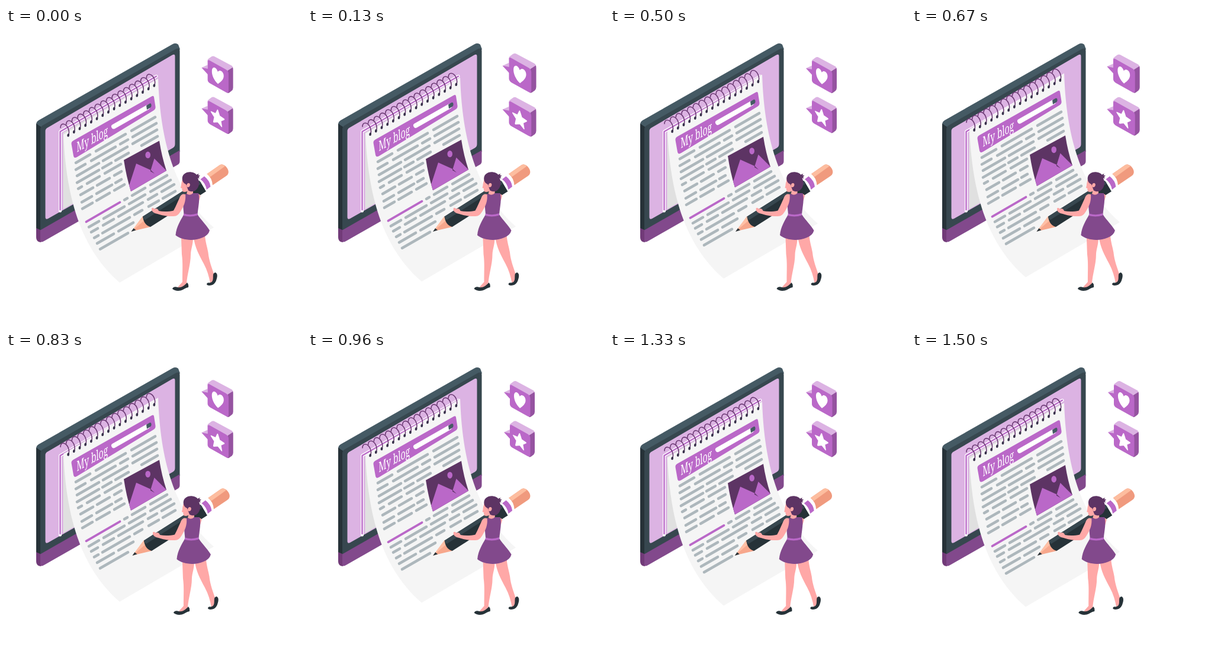
Write an HTML page that moves like this. It is 500 by 500 pixels and loops after 1540 ms.

```html
<!DOCTYPE html>
<html lang="en">
<head>
<meta charset="utf-8">
<title>My blog</title>
<style>
html, body { margin: 0; width: 100%; height: 100%; overflow: hidden; background: #fff; }
svg { display: block; width: 100vw; height: 100vh; }
.main { fill: #ba68c8; }
.deep { fill: #82498c; }
.dark { fill: #5d3464; }
.pale { fill: #dcb3e3; }
.ink { fill: #263238; }
.slate { fill: #37474f; }
.skin { fill: #ffa8a7; }
.white { fill: #fff; }
.line { fill: none; stroke-linecap: round; stroke-linejoin: round; }
text { font: 500 23.5px "Noto Serif", serif; fill: #fff; }
</style>
</head>
<body>
<svg viewBox="0 0 500 500">
  <g id="monitor">
    <path fill="#455a64" d="M51 163Q51 158.500 55 156L281 27.500Q287 24.500 291 28L294 36 60 170Z"/>
    <path class="ink" d="M51 161.500L59 167V343L51 339Z"/>
    <path fill="#713a78" d="M51 338L59 341.500V362Q51 361 51 354Z"/>
    <path class="slate" d="M58 171Q58 167 62 164.500L286 36Q293.500 32 293.500 39V209L58 343Z"/>
    <path class="deep" d="M58 341.500L293.500 206.500V225Q293.500 229 290 231L65 359.500Q58 363.500 58 359Z"/>
    <path class="pale" d="M66.500 174Q66.500 170.500 70 168.500L281 45.500Q285.500 43 285.500 48V196Q285.500 200.500 282 202.500L71 322Q66.500 324.500 66.500 319Z"/>
    <path fill="#e0e0e0" d="M96.500 177L254 87V216L96.500 306Z"/>
    <path class="line" stroke="#fff" stroke-width="5" stroke-linecap="butt" d="M91.500 309V175L254 81.500"/>
    <path class="line" stroke="#ba68c8" stroke-width="2.400" d="M91.500 307V175L254 81.500"/>
  </g>
  <g id="paper">
    <path fill="#f5f5f5" d="M97 180L257 85.500C260 171 276 271 351 337L192 430C117 365 101 265 97 180Z"/>
    <path class="main" d="M110.500 196Q110 192 114 190L246 115.500Q249.500 113.500 250 117L252.500 133Q253 137 249 139.500L120 218Q115 221 114 216Z"/>
    <text transform="matrix(.59 -.32 .02 1 119.500 210)">My blog</text>
    <path class="line" stroke="#fff" stroke-width="8" d="M182 166.500L239 134"/>
    <path fill="#455a64" d="M237 131L243 127.500Q245.500 127 245.500 130V132Q245 134 243 135L238 138Z"/>
    <g id="copy" class="line" stroke="#adb7bc" stroke-width="4.600"></g>
    <path class="line" stroke="#ba68c8" stroke-width="3.800" d="M135.500 327.500L192.500 294.500"/>
    <path class="dark" d="M199 223L259 190.500Q263 217 271 241L211 276Q203 250 199 223Z"/>
    <path class="main" d="M211 276L208 266 220 229 244.500 240 250.500 220.500 271 241Z"/>
    <path class="dark" d="M244 239.500L251 246 244 242Z"/>
    <ellipse class="main" cx="239.700" cy="214.500" rx="4.300" ry="5.600"/>
    <g id="rings"></g>
  </g>
  <g id="icons">
    <g id="box">
      <path class="pale" d="M331 68L341 63.500V72Z"/>
      <path class="main" d="M331 68L342 70V80Z"/>
      <path class="pale" d="M341 58Q340 55 343 53L347 50Q350 48 353 50L380 64.500Q383 66 382.500 69L375 74Z"/>
      <path fill="#9553a0" d="M374 73L382.500 67.500Q383 69 383 71V101Q383 104 381 106L377 109Q375 110.500 373 109.500Z"/>
      <path class="main" d="M341 58.500Q341 54 345 56.500L371 71Q375.500 73.500 375.500 78V106Q375.500 111 371 108.500L345 94Q341 91.500 341 88Z"/>
    </g>
    <use href="#box" y="67.500"/>
    <path class="white" d="M358 95C351.500 89 347.500 80 348 73C348.500 65.500 355 66.500 357.800 75C360.500 70 368 74.500 367.500 82.500C367 88.500 362 92 358 95Z"/>
    <path id="star" class="white" stroke="#fff" stroke-width="2" stroke-linejoin="round" transform="matrix(.87 .5 0 1 357.500 151)"/>
  </g>
  <g id="writer">
    <g id="pencil">
      <path fill="#f7a78c" d="M212 343.500L231 318 244 336Z"/>
      <path fill="#ffc0a6" d="M212 343.500L231 318 235 324Z"/>
      <path class="ink" d="M211.500 344L215.500 338.200 219.500 341.500Z"/>
      <path class="ink" d="M231 318.500L327 257.500 338 276 244 336Q233 333 231 318.500Z"/>
      <path class="slate" d="M231 318.500L327 257.500 330 263 235 324Q232 323 231 318.500Z"/>
      <path class="white" d="M326 257.500L340 246.500Q349 254 349 265L337 274.500Q335 264 326 257.500Z"/>
      <path class="main" d="M328.500 255.500L335 250.500Q344.500 258 345.500 268L339 273Q337 262 328.500 255.500Z"/>
      <path fill="#f09a7e" d="M339.500 246.500L361 231.500C368 227 378 239 375.500 245.500Q375 248 372 250L349 265.500Q348 253 339.500 246.500Z"/>
      <path fill="#fdbd9f" d="M339.500 246.500L361 231.500Q366 229 370 233.500L345 251.500Q343 248.500 339.500 246.500Z"/>
    </g>
    <g id="legs">
      <path class="skin" d="M317 354L336 350C337 362 340 370 341.500 379C343 394 348 405 351 415L350 427 345 431C343 420 340 409 334 398C326 383 319 370 317 354Z"/>
      <path class="skin" d="M296 354H316C316 367 312 374 312 383C312 399 306 416 305 432L299 440 289 439 298 429C298 408 299 397 297 382Z"/>
      <path class="ink" d="M354 413C358 415 357 421 355.500 425C354 431 350 435 343 435Q338 434.500 339.500 431.500C342 429 344 432 348 428.500C351 425 349 419 350.500 415Q352 413 354 413Z"/>
      <path class="ink" d="M306 430Q309 433 308 438C303 439 300 442 295 443.500Q286 445 281 440.500Q283 436.500 288 437.500C294 440 301 436 306 430Z"/>
    </g>
    <path class="skin" d="M322 281Q328 279 328.500 284L326 292Z"/>
    <path class="deep" d="M303 280Q309 282 314 279H325C328 288 325 301 323.500 315C330 325 339 333 344 342Q342 350 332 354C316 361 296 358 286.500 350C288 335 295 325 300.500 315C300 305 297 292 303 280Z"/>
    <path class="main" d="M300.500 313.500Q312 317 323.500 313L323.300 316.500Q312 320 299.500 317Z"/>
    <path class="skin" d="M308 271H316V279Q311 284 305 280Z"/>
    <path class="skin" d="M303 281C304 289 302 298 297 306Q292 316 287 317.500C276 319 264 317 256 314C250 313 246 310 246 306C246 303 249 303 251 306C253 304 257 305 258 309C267 311 276 310 283 308.500C287 301 291 292 294 285Q297 279 303 281Z"/>
    <path class="skin" d="M299 252C297 259 296 263 296 266L295 270 297.500 271Q297 275 299 276.500Q305 278 309 274L315 264 311 253Z"/>
    <path class="dark" d="M298 257C296 247 305 242.500 313 243.500Q319 244 322 248Q323 246 326 246.500L324.500 248.500 328 249.500 325.500 251.500 327 254 324 253.500C328 261 326 271 319 275Q313 277.500 308 274.500L306 269 304 264Q299 262 298 257Z"/>
    <ellipse class="skin" cx="308" cy="265.500" rx="2.800" ry="3.600" transform="rotate(15 308 265.500)"/>
  </g>
</svg>
<script>
const LOOP = 1540, CYCLE = 1515, LEAD = 35;
const SLOPE = -0.575;
const el = id => document.getElementById(id);

function add(parent, d, attrs = {}) {
  const path = document.createElementNS("http://www.w3.org/2000/svg", "path");
  path.setAttribute("d", d);
  for (const key in attrs) path.setAttribute(key, attrs[key]);
  parent.append(path);
}

// Each row: left x, left y, then the dashes as "from-to" along x
const rows = [
  [117, 228.3, "118-142 152-202 212-252"],
  [118, 239.3, "118-134 144-185 193-206 214-254"],
  [119, 250.3, "120-157 164-205 214-255"],
  [120, 261.3, "120-157 163-178 185-207 229-256"],
  [122, 271.5, "122-128 137-158 167-194"],
  [125, 282.5, "126-147 154-175 183-195"],
  [128, 294.3, "128-145 153-179 185-195"],
  [129, 305.3, "129-146 153-175 183-200"],
  [136, 327.3, "200-205 213-235 244-272"],
  [140, 336.3, "140-157 165-200 208-235 244-278"],
  [143, 345.5, "144-155 164-182 190-231 240-255 263-284"],
  [149, 354.5, "149-156 163-209 217-230 241-258 265-286"],
  [153, 364.5, "154-182 190-215"],
  [159, 373.5, "159-206"]
];
for (const [x, y, dashes] of rows) {
  const at = px => `${px} ${y + (px - x) * SLOPE}`;
  for (const dash of dashes.split(" ")) {
    const [a, b] = dash.split("-").map(Number);
    add(el("copy"), `M${at(a)}L${at(b)}`);
  }
}

for (let i = 0; i < 16; i++) {
  const transform = `translate(${105 + i * 9.68} ${181.5 - i * 5.6})`;
  add(el("rings"), "M-13 -13C-13 -22 -4 -21 0 -12C2 -7 2 -3 0 0",
    { class: "line", stroke: "#6d3b75", "stroke-width": 1.6, transform });
  add(el("rings"), "M.3 -1.200L0 .5",
    { class: "line", stroke: "#37304a", "stroke-width": 3.6, transform });
}

el("star").setAttribute("d", "M" + Array.from({ length: 10 }, (_, i) => {
  const r = i % 2 ? 6 : 12.8, a = i * Math.PI / 5;
  return `${r * Math.sin(a)} ${-r * Math.cos(a)}`;
}).join("L") + "Z");

// Linear keyframes: [phase, value]
const beat = [[0, 1], [.1, 1.1], [.3, 1], [.4, 1], [.5, 1.1], [.6, 1], [1, 1]];
const float = [[0, 0], [.5, -10], [1, 0]];
const shake = [[0, 0], [.1, -1], [.2, 2], [.3, -4], [.4, 4], [.5, -4],
  [.6, 4], [.7, -4], [.8, 2], [.9, -1], [1, 0]];

function sample(keys, p) {
  const i = Math.max(1, keys.findIndex(k => k[0] >= p));
  const [p0, v0] = keys[i - 1], [p1, v1] = keys[i];
  return v0 + (v1 - v0) * (p - p0) / (p1 - p0);
}

function draw(ms) {
  const p = Math.min(1, (ms % LOOP + LEAD) / CYCLE);
  const move = (id, value) => el(id).setAttribute("transform", value);
  move("paper", `translate(0 ${sample(float, p) + .4})`);
  move("writer", `translate(${sample(shake, p) + .2} 0)`);
  move("icons", `translate(357 113.300) scale(${sample(beat, p)}) translate(-357 -113.300)`);
}

function tick() {
  draw(performance.now());
  requestAnimationFrame(tick);
}
tick();
</script>
</body>
</html>
```
